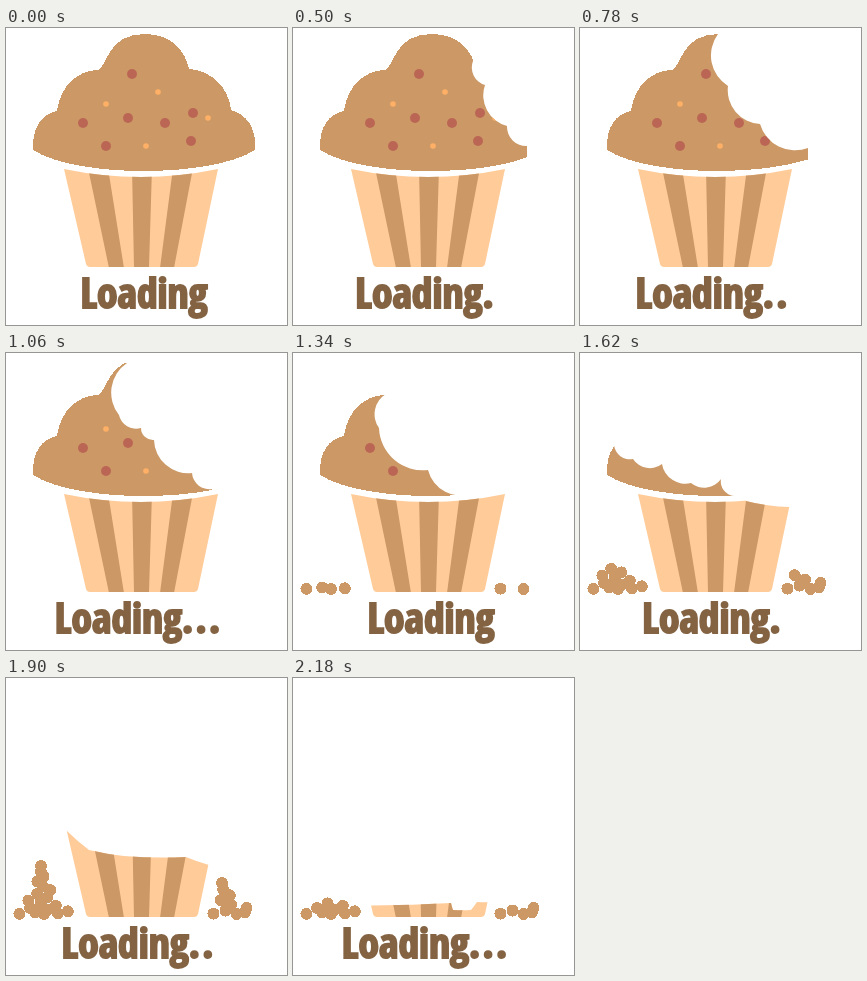
An HTML page for the animation above (2460 ms loop, 281 px wide and 297 px high).

```html
<!DOCTYPE html>
<html lang="en">
<head>
<meta charset="utf-8">
<title>Loading muffin</title>
<style>
  html, body { margin: 0; width: 100%; height: 100%; overflow: hidden; background: #fff; }
  svg { display: block; width: 100vw; height: 100vh; }
  text {
    font: 700 41.5px "Open Sans Condensed", "Roboto Condensed", "Liberation Sans Narrow", "Open Sans", sans-serif;
    font-stretch: condensed;
    word-spacing: -8px;
    text-anchor: middle;
    fill: #846343;
    stroke: #846343;
    stroke-width: 2px;
  }
  .crisp { shape-rendering: crispEdges; }
  .brown { fill: #cc9966; }
  .cream { fill: #ffcc99; }
  .berry { fill: #bb6655; }
  .nut { fill: #ffb066; }
</style>
</head>
<body>
<svg viewBox="0 0 281 297">
  <defs>
    <clipPath id="cakeClip"><path id="cakeLeft" class="crisp"/></clipPath>
    <clipPath id="cupClip"><path id="cupLeft" class="crisp"/></clipPath>
    <clipPath id="cupShape">
      <path class="crisp" d="M58 141Q135 157 212 141L192 236Q191 239 188 239H84Q81 239 80 236Z"/>
    </clipPath>
  </defs>
  <g clip-path="url(#cakeClip)">
    <path class="brown crisp" d="M27 122C26 100 35 86 51 83C54 58 72 42 92 42C102 38 101 6 139 6C165 6 179 22 183 41C205 42 223 60 225 82C240 86 251 100 249 122C205 150 71 150 27 122Z"/>
    <g id="toppings"></g>
  </g>
  <g clip-path="url(#cupClip)">
    <g clip-path="url(#cupShape)">
      <rect class="cream" x="50" y="135" width="170" height="110"/>
      <path class="brown" d="M82 140H102L118 240H103ZM126 140H146L143 240H128ZM167 140H187L168 240H154Z"/>
    </g>
  </g>
  <g id="crumbs" class="brown crisp"></g>
  <text id="label" y="280"></text>
</svg>
<script>
const LOOP = 2460, FIRST = 500, STEP = 280;
const GROUND = 236, CRUMB_RADIUS = 6, GOLDEN = 0.618;
const WHOLE = [[281, 0]];

// Corners between tooth marks, from left to right; one entry per bite
const cakeBites = [
  WHOLE,
  [[180, 33], [192, 57], [214, 98], [234, 118]],
  [[138, 6], [148, 58], [180, 96], [228, 120]],
  [[121, 10], [113, 62], [135, 75], [148, 87], [186, 120], [206, 136]],
  [[93, 41], [86, 75], [135, 117], [180, 141]],
  [[34, 92], [53, 106], [82, 111], [111, 130], [141, 126], [154, 143]],
  []
];
const cupBites = [
  [[166, 148], [186, 152], [210, 154]],
  [[0, 140], [61, 153], [83, 172], [118, 178], [180, 179], [203, 187]],
  [[0, 225], [158, 225], [160, 232], [178, 232], [184, 224], [203, 224]]
];
const CUP_START = 5;

const berries = [[126, 46], [77, 95], [122, 90], [159, 95], [187, 85], [100, 118], [185, 113]];
const nuts = [[100, 76], [152, 64], [202, 90], [140, 118]];

const crumbShare = [0, 0, 0, 0, 0.2, 0.65, 1, 0.5];
const heaps = [
  makeHeap(4, 72, 35, 48, 18),
  makeHeap(199, 262, 216, 31, 10)
];

const byId = id => document.getElementById(id);
const circles = (points, r, name = "") =>
  points.map(([x, y]) => `<circle class="${name}" cx="${x}" cy="${y}" r="${r}"/>`).join("");

// A heap narrows towards its apex; its crumbs are listed from the ground up
function makeHeap(left, right, apex, height, count) {
  return Array.from({ length: count }, (_, i) => {
    const level = i / (count - 1);
    const spread = left + (right - left) * ((i * GOLDEN + 0.5) % 1);
    return [spread + (apex - spread) * level, GROUND - height * level ** 2];
  });
}

// Region left over below a row of hollow arcs; larger roundness gives flatter arcs
function remains(corners, roundness) {
  if (!corners.length) return "";
  const [first, ...rest] = corners;
  let previous = first, path = `M0 0H${first[0]}V${first[1]}`;
  for (const [x, y] of rest) {
    const r = roundness * Math.hypot(x - previous[0], y - previous[1]);
    path += `A${r} ${r} 0 0 0 ${x} ${y}`;
    previous = [x, y];
  }
  return path + "V300H0Z";
}

function show(step) {
  byId("cakeLeft").setAttribute("d", remains(cakeBites[step] || [], 0.68));
  byId("cupLeft").setAttribute("d", remains(cupBites[step - CUP_START] || WHOLE, 8));
  byId("crumbs").innerHTML = heaps
    .map(heap => circles(heap.slice(0, Math.round(heap.length * crumbShare[step])), CRUMB_RADIUS))
    .join("");
  const dots = step % 4;
  byId("label").setAttribute("x", dots ? 131.5 : 138);
  byId("label").textContent = "Loading" + Array(dots).fill(".").join(" ");
}

byId("toppings").innerHTML = circles(berries, 5, "berry") + circles(nuts, 2.8, "nut");

let shown = -1;
function frame() {
  const time = performance.now() % LOOP;
  const step = time < FIRST ? 0 : 1 + Math.floor((time - FIRST) / STEP);
  if (step !== shown) show(shown = step);
  requestAnimationFrame(frame);
}
frame();
</script>
</body>
</html>
```
